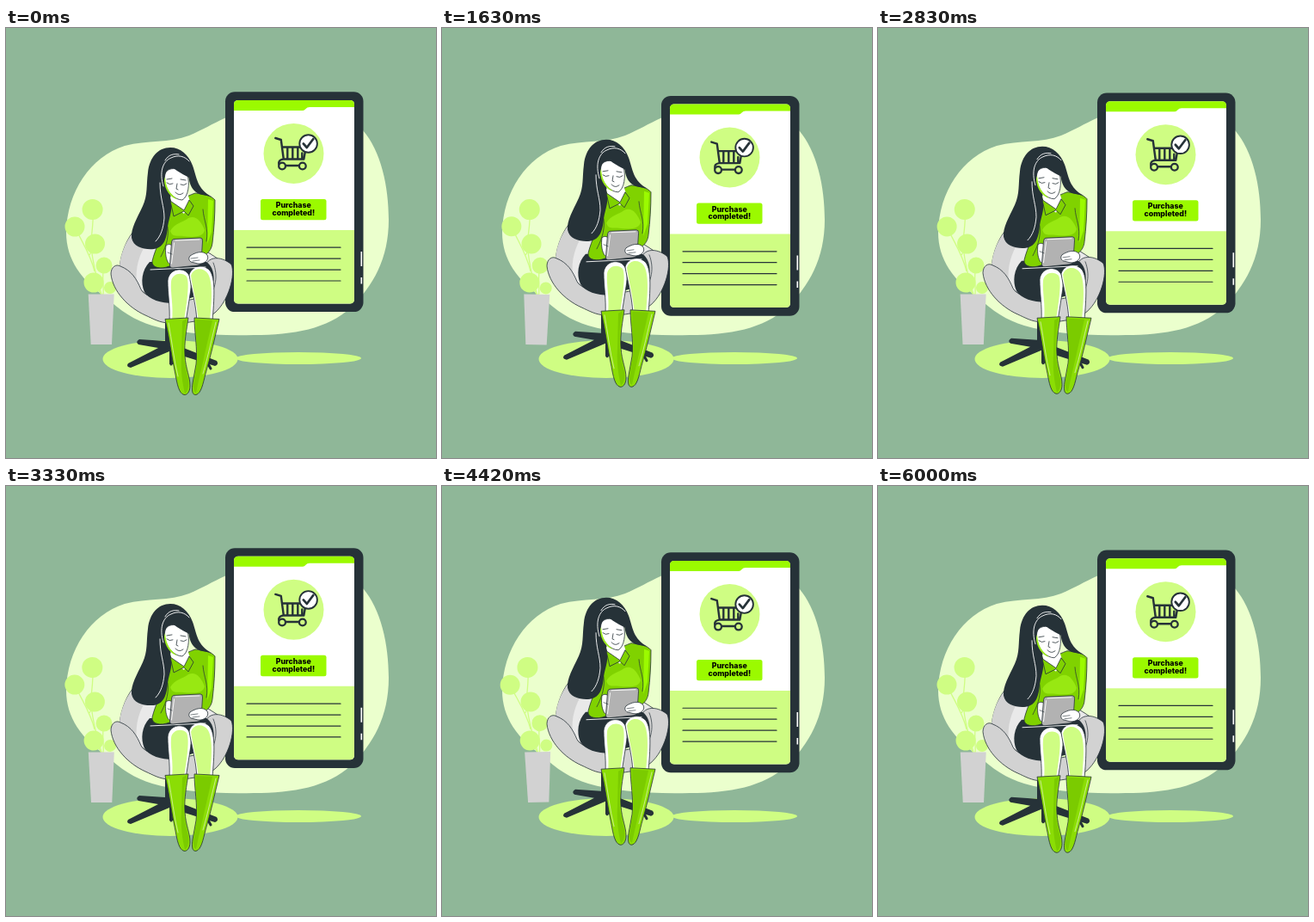
An HTML page that plays this animation: 500x500 px, repeating every 6.04 s.

```html
<!DOCTYPE html>
<html lang="en">
<head>
<meta charset="utf-8">
<title>Purchase completed</title>
<style>
  html, body { margin: 0; width: 100%; height: 100%; overflow: hidden; background: #8fb798; }
  svg { display: block; width: 100vw; height: 100vh; }
  .ink { fill: #263238; }
  .pale { fill: #cffd83; }
  .lime { fill: #9bfa00; }
  .line { fill: none; stroke: #263238; stroke-linecap: round; stroke-linejoin: round; }
  .edge { stroke: #263238; stroke-width: .8; stroke-linejoin: round; }
  .shine { fill: none; stroke: #fff; stroke-width: .9; stroke-linecap: round; }
  .gray { fill: #d2d2d2; }
  .top { fill: #80d200; }
  .boot { fill: #8bdd05; }
  .fold { fill: #7bcb00; }
  .glow { fill: #98e812; }
  .skin { fill: #fff; }
  text { font: 800 8.8px Inter, "Open Sans", sans-serif; text-anchor: middle; }
</style>
</head>
<body>
<svg viewBox="0 0 500 500">
  <path fill="#ebffcd" d="M70 238C71 190 98 150 138 137C165 130 190 134 213 125C229 118 241 111 254 105C270 98 286 93 300 92C345 87 391 91 415 119C436 143 445 184 445 223C445 268 427 300 401 325C374 350 334 357 288 357C240 358 200 355 170 346C150 340 133 329 116 313C88 294 70 269 70 238Z"/>
  <ellipse class="pale" cx="191" cy="385" rx="78.500" ry="22"/>
  <ellipse class="pale" cx="340" cy="384" rx="73" ry="7"/>

  <g id="plant">
    <g fill="none" stroke="#cffd83" stroke-width="1.300">
      <path d="M111 310C104 285 99 266 99 247C100 235 102 225 101 211"/>
      <path d="M80 231C88 249 98 262 103 283M104 251L97 264M114 276C111 288 114 298 113 310M102 296L111 310"/>
    </g>
    <g class="pale">
      <circle cx="100.600" cy="211" r="12"/>
      <circle cx="80" cy="231" r="11.500"/>
      <circle cx="103.500" cy="251" r="11.500"/>
      <circle cx="114" cy="276" r="9.500"/>
      <circle cx="102" cy="296" r="11.500"/>
      <circle cx="121" cy="302" r="7"/>
    </g>
    <path class="gray" d="M95.700 309.500H125.700L123 368H98.700Z"/>
  </g>

  <g id="tablet">
    <rect class="ink" x="255" y="74.400" width="160.500" height="255.800" rx="11"/>
    <rect fill="#fff" x="265" y="84" width="140" height="236.500" rx="5"/>
    <path class="lime" d="M265 96V89Q265 84 270 84H400Q405 84 405 89V92H353Q350 92 348.500 94T345 96Z"/>
    <path class="pale" d="M265 235H405V315.500Q405 320.500 400 320.500H270Q265 320.500 265 315.500Z"/>
    <path class="line" stroke-width="1.200" d="M280 255.300H389M280 268.200H389M280 281.200H389M280 294.100H389"/>
    <path d="M413.300 260V277M413.300 290V297.500" stroke="#fff" stroke-width="1.600"/>
    <circle class="pale" cx="334.500" cy="146" r="35"/>
    <g transform="translate(-.7 -.4)">
      <path class="line" stroke-width="2.400" d="M314 128.500L320.500 130.500L323.500 153H347L349.500 139H322M328 139V152M334 139V152M340 139V152M345 146V152M323 153Q317 154 318 159M326 160.500H341"/>
      <g fill="#cffd83" stroke="#263238" stroke-width="2.300">
        <circle cx="321.800" cy="161" r="3.900"/>
        <circle cx="345.500" cy="161" r="3.900"/>
      </g>
      <circle cx="352.300" cy="135" r="10.300" fill="#fff" stroke="#263238" stroke-width="1.900"/>
      <path class="line" stroke-width="2.700" d="M346.500 135L350.500 139.500L358 129.500"/>
    </g>
    <rect class="lime" x="296" y="199" width="76.500" height="24.300" rx="2.500"/>
    <text x="334.300" y="209.300">Purchase</text>
    <text x="334.300" y="218">completed!</text>
  </g>

  <g id="sitter">
    <!-- chair -->
    <path class="ink" d="M185 333H191V366L245 387Q248 391 243 393L195 378V391H190V376L145 395Q139 394 142 390L177 372L154 368Q150 365 155 362L185 364Z"/>
    <path class="line" stroke-width="3" d="M192 372V391M228 378L238 396"/>
    <path class="edge" fill="#e9e9e9" d="M147 238C138 250 132 268 132 283L165 312L240 310L246 268L190 232Z"/>
    <path class="gray" d="M147 239C138 250 132 266 132 280L152 296C150 280 155 262 164 250Z"/>
    <path class="gray edge" d="M122 286C122 278 128 274 133 277C146 282 152 292 157 304C165 320 226 322 236 306C240 298 236 284 233 274C238 265 252 266 262 275C267 287 259 317 243 331C231 341 212 343.500 190 343C179 343 171 338 162 334C142 325 124 306 122 286Z"/>
    <path class="line" stroke-width=".7" d="M241 273C247 288 244 304 234 316"/>

    <!-- skirt and legs -->
    <path class="ink" d="M167 272C158 281 156 296 161 307C166 316 181 320 194 320L238 307C243 296 244 280 233 272Z"/>
    <path class="skin edge" d="M188 294C189 282 201 278 209 283C216 288 216 299 214 310L209 342H190C191 324 188 309 188 294Z"/>
    <path class="pale" d="M192 295C193 286 204 283 210 289C214 297 210 320 207 342H193C195 322 191 309 192 295Z"/>
    <path class="skin edge" d="M213 287C216 276 230 274 237 282C244 292 242 314 240 342H222C221 320 215 301 213 287Z"/>
    <path class="pale" d="M215 288C218 278 230 278 235 286C241 297 239 319 237 342H224C222 320 217 303 215 288Z"/>
    <path class="shine" d="M168 281L232 278"/>

    <!-- boots -->
    <path class="boot edge" d="M185 338.500L212 337C210 351 207 365 208 381C209 397 214 405 214 416C214 424 210 427 207 426.500C201 425 199 414 197 403C192 380 190 360 185 338.500Z"/>
    <path class="fold" d="M205 341L210.500 338C207 354 205 371 207 387L212 409C213 417 211 423 208 425C205 412 203 398 204 382Z"/>
    <path class="boot edge" d="M219 337L248 338.500C243 359 238 382 232 402C229 414 227 425 221 426.500C216 427 216 421 217 413L221 391C223 373 219 354 219 337Z"/>
    <path class="fold" d="M221 339L240 340C235 362 228 392 221 424C216 422 218 409 222 392C224 374 220 354 221 339Z"/>
    <path class="shine" stroke="#cffd83" opacity=".6" d="M189 343C193 364 195 385 200 405M244 342C239 362 235 382 229 402"/>

    <!-- sweater -->
    <path class="top edge" d="M191 207C199 203 208 196 220 192C230 193 239 195 243 200C243 218 242 233 240 250C239 261 229 268 221 265L190 277C180 281 169 279 170 271C174 255 181 244 184 230Z"/>
    <path class="glow" d="M191 236C196 227 206 226 212 221C221 217 227 225 231 235C229 244 218 243 206 242C199 241 194 244 191 236Z"/>
    <path class="lime" d="M235 199L241 201L239 237L234 251Z"/>
    <path class="line" stroke-width=".7" d="M229 211C230 225 236 233 233 248M188 231C190 246 184 258 180 266"/>

    <!-- handheld and hands -->
    <path class="skin edge" d="M186 253C191 249 196 254 195 261L196 276C189 278 184 268 186 253Z"/>
    <path class="edge" fill="#b2b2b2" d="M195 245.500L226 244Q229 244 228.500 248L227 272Q227 275 223 276L194 279Q190 279 190.500 275L192.500 249Q193 245.500 195 245.500Z"/>
    <path class="shine" d="M197 247L225 246M195.500 250L192.500 274"/>
    <path class="skin edge" d="M214 265C220 261 229 258 234 264C237 270 230 275 223 274L215 272Q211 269 214 265Z"/>
    <path class="line" stroke-width=".6" d="M215 268L223 267M217 271L225 270M188 261L193 263"/>

    <!-- hair, neck and face -->
    <path class="ink" d="M191 139C177 139 167 150 165 168C163 183 165 194 159 207C152 222 145 233 146 244C148 255 161 258 172 257C185 255 187 242 188 231C190 219 195 209 191 197L212 170C213 182 217 193 231 194.500L239 196C222 187 222 174 217 160C212 147 203 139 191 139Z"/>
    <path class="skin" d="M191 192H211L214 202L207 216L193 206Z"/>
    <path class="top edge" d="M191 201L207 212L213 200L218 207L212 218L207 213L195 219Z"/>
    <path class="skin edge" d="M185 169C189 161 202 162 211 171C214 181 212 196 205 200C196 200 186 190 184 177Z"/>
    <path fill="#9bec1c" d="M185 173C186 186 190 192 199 199C192 198 184 188 184 177Z"/>
    <path class="ink" d="M184 174C182 160 189 149 202 151C213 153 219 164 219 177C211 173 201 168 192 161C187 164 186 168 184 174Z"/>
    <path class="line" stroke-width=".8" d="M187 180Q190 183 194 181M203 182Q207 184 210 181M187 176L193 175M203 176L209 177M199 181L198 187L200 188M197 191Q201 196 206 192"/>
    <path class="shine" d="M183 184C178 168 182 155 192 151C200 147 208 149 213 155M185 154C189 147 195 146 201 147M179 180C179 198 184 207 184 221C183 233 180 242 174 248"/>
  </g>
</svg>
<script>
  const LOOP = 6040, HALF = LOOP / 2;
  const part = id => document.getElementById(id);
  const plant = part("plant"), tablet = part("tablet"), sitter = part("sitter");

  // Linear wave from 0 to 1 and back.
  const wave = (t, period) => 1 - Math.abs(2 * ((t / period % 1 + 1) % 1) - 1);

  function draw(now) {
    const t = now % LOOP;
    const sway = 2 * wave(t + LOOP / 4, LOOP) - 1;
    const drop = 10 * wave(t - 470, HALF) - 3.2;
    plant.setAttribute("transform", `rotate(${sway} 97 283)`);
    tablet.setAttribute("transform", `translate(0 ${drop})`);
    sitter.setAttribute("transform", `translate(0 ${-10 * wave(t, HALF)})`);
    requestAnimationFrame(draw);
  }
  requestAnimationFrame(draw);
</script>
</body>
</html>
```
